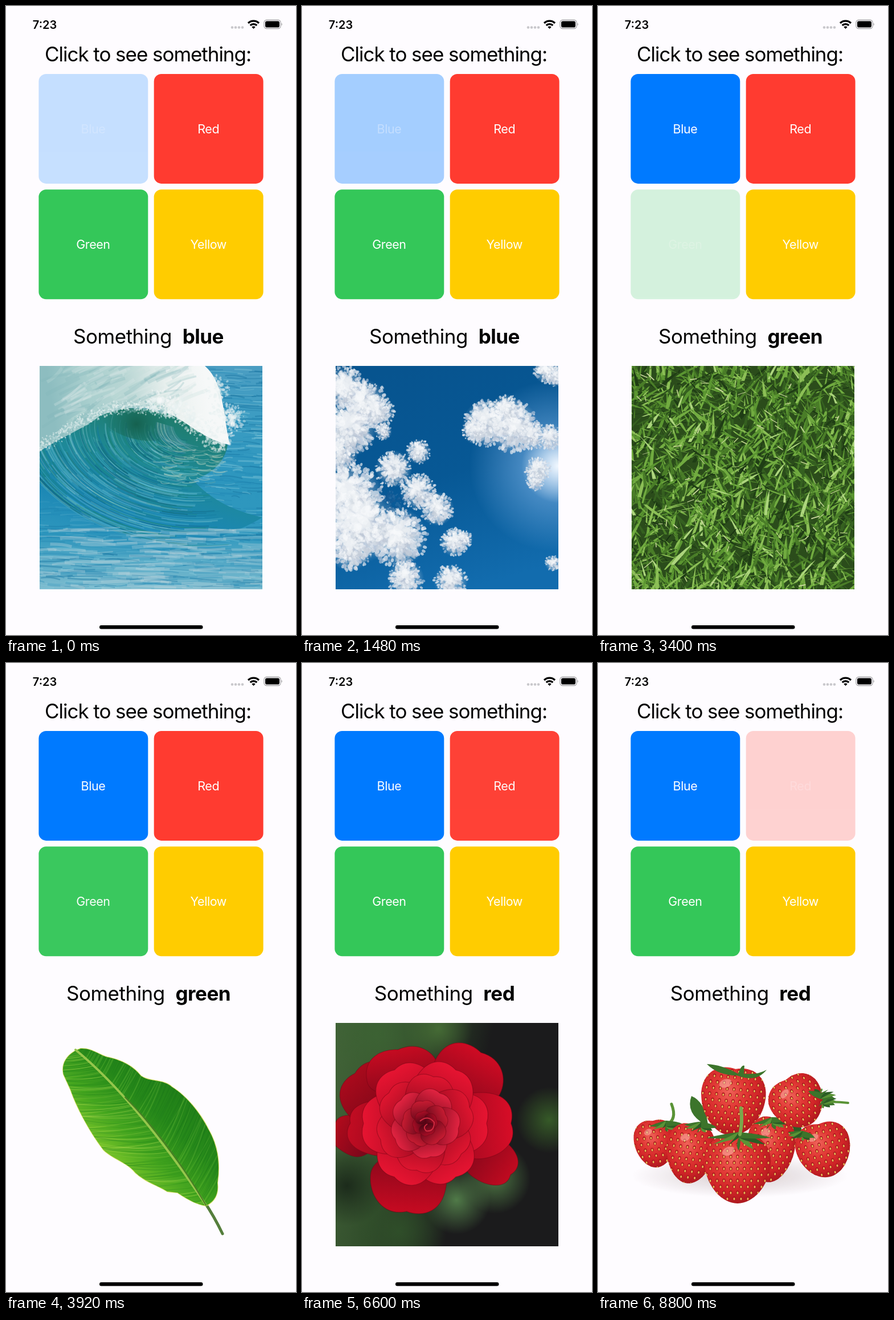
Animation of 509x1101 px, one loop 9.04 s. Source, as an HTML page with a canvas:

```html
<!DOCTYPE html>
<html lang="en">
<head>
<meta charset="utf-8">
<title>Click to see something</title>
<style>
  html, body { margin: 0; width: 100%; height: 100%; overflow: hidden; background: #fefcff; }
  svg, canvas { position: absolute; left: 0; top: 0; display: block; }
  canvas { left: 59px; top: 630px; }
  text { font-family: Inter, Roboto, sans-serif; font-optical-sizing: none; white-space: pre; text-anchor: middle; }
  .title { font-size: 35px; letter-spacing: -.03em; }
  .caption { font-size: 35px; letter-spacing: -.014em; }
  .caption tspan { font-weight: 700; }
  .button, .button text { opacity: var(--fade, 1); }
  .button text { font-size: 21.5px; letter-spacing: -.02em; fill: #fff; }
  .clock { font-size: 20px; font-weight: 600; }
</style>
</head>
<body>
<svg width="509" height="1101" viewBox="0 0 509 1101">
  <text class="clock" x="68" y="39.5">7:23</text>
  <g fill="#c9c8cc">
    <circle cx="397" cy="37.5" r="2.3"/><circle cx="403" cy="37.5" r="2.3"/>
    <circle cx="409" cy="37.5" r="2.3"/><circle cx="415" cy="37.5" r="2.3"/>
  </g>
  <g fill="none" stroke="#000" stroke-width="3.2">
    <path d="M425 30a13.500 13.500 0 0 1 19 0M428.700 34a8.300 8.300 0 0 1 11.600 0"/>
    <path d="M431.300 36.800a4.600 4.600 0 0 1 6.400 0L434.500 40Z" fill="#000" stroke="none"/>
  </g>
  <rect x="453" y="24.500" width="29" height="15" rx="4.500" fill="none" stroke="#a3a2a5" stroke-width="1.300"/>
  <rect x="455" y="26.500" width="25" height="11" rx="2.800"/>
  <path d="M483.500 29.500q2.600 2.500 0 5Z" fill="#a3a2a5"/>
  <text class="title" x="249" y="97">Click to see something:</text>
  <g id="buttons"></g>
  <text class="caption" x="250" y="591">Something  <tspan id="word">blue</tspan></text>
  <rect x="164" y="1084" width="181.500" height="6.500" rx="3.250"/>
</svg>
<script>
const SIZE = 391, LOOP = 9040, TAU = Math.PI * 2;
const $ = id => document.getElementById(id);

let seed = 1;
const rand = (a = 0, b = 1) => {
  seed = (seed * 1664525 + 1013904223) >>> 0;
  return a + (b - a) * seed / 4294967296;
};
const pick = list => list[Math.floor(rand(0, list.length))];

// ---- drawing helpers ----
function ramp(g, colors) {
  colors.forEach((c, i) => g.addColorStop(i / (colors.length - 1), c));
  return g;
}
const linear = (c, x0, y0, x1, y1, ...colors) => ramp(c.createLinearGradient(x0, y0, x1, y1), colors);
const radial = (c, x, y, r, ...colors) => ramp(c.createRadialGradient(x, y, 0, x, y, r), colors);
function fill(c, d, paint) {
  c.fillStyle = paint;
  c.fill(new Path2D(d));
}
function line(c, d, paint, width) {
  c.strokeStyle = paint;
  c.lineWidth = width;
  c.stroke(new Path2D(d));
}
function oval(c, x, y, rx, ry, turn, paint) {
  c.beginPath();
  c.ellipse(x, y, rx, ry, turn, 0, TAU);
  c.fillStyle = paint;
  c.fill();
}
const glow = (c, x, y, r, color) => oval(c, x, y, r, r, 0, radial(c, x, y, r, color, color + "00"));
function cover(c, paint) {
  c.fillStyle = paint;
  c.fillRect(0, 0, SIZE, SIZE);
}
// scatter small discs around a point, thinning outwards
function puff(c, x, y, r, colors, count) {
  for (let i = 0; i < count; i++) {
    const a = rand(0, TAU), d = r * rand() ** .6;
    const s = 1 + r * rand(.03, .2) * (1.3 - d / r);
    oval(c, x + d * Math.cos(a), y + d * Math.sin(a), s, s * .75, a, pick(colors));
  }
}

// ---- pictures ----
function wave(c) {
  cover(c, linear(c, 0, 0, 0, SIZE, "#4b9dc2", "#3b9cc2", "#2d96be", "#2f98be", "#7ebccf"));
  for (let i = 0; i < 900; i++) {
    const y = rand(0, SIZE), x = rand(-30, SIZE), w = rand(12, 70);
    line(c, `M${x} ${y}q${w / 2} ${rand(-4, 4)} ${w} ${rand(-2, 5)}`, pick(["#15709e66", "#86c8d966", "#2288b460"]), rand(1, 3));
  }
  fill(c, "M0 140C60 85 150 62 215 80C260 92 290 128 330 138C325 170 300 190 270 200C300 235 345 255 391 265C345 295 200 350 0 330Z",
    linear(c, 180, 75, 110, 335, "#1f7c6c", "#1e8996", "#1b87b4", "#2790bb00"));
  for (let i = 0; i < 520; i++) {
    const r = rand(.1, 1.35), a = rand(1.2, 2.7);
    c.beginPath();
    c.ellipse(255, 115, 225 * r, 148 * r, .12, a, a + rand(.2, .75));
    c.strokeStyle = pick(["#0d5c7866", "#4aacc460", "#147a9e66", "#8fd0d455", "#1a806d55"]);
    c.lineWidth = rand(.8, 2.6);
    c.stroke();
  }
  for (let i = 0; i < 60; i++) {
    const x = rand(225, 330), y = 140 + rand(0, 65);
    line(c, `M${x} ${y}q-14 4 -${rand(14, 34)} ${rand(-5, 3)}`, pick(["#d4e0c866", "#b9d3c266", "#76aaa066"]), rand(1, 3));
  }
  oval(c, 170, 102, 62, 26, .25, radial(c, 170, 102, 60, "#15614f", "#1a705f00"));
  for (let i = 0; i < 30; i++)
    line(c, `M${205 + i} ${98 + i * .3}q${-4 + i * .3} 28 ${24 + i * .7} ${34 + rand(0, 12)}`, pick(["#a7ccca77", "#5598a077", "#38808a77"]), 1.2);
  const lip = "C290 130 265 102 230 85C195 70 150 68 105 88C75 112 30 128 0 150Z";
  fill(c, "M0 0H290C325 30 322 90 334 138" + lip, linear(c, 20, 60, 290, 20, "#8dbdc0", "#a9cfce", "#b9d6d4", "#e9f0ee", "#f6f8f8"));
  for (let i = 0; i < 110; i++) {
    const x = rand(0, 240), y = rand(0, 118 - x * .2);
    line(c, `M${x} ${y}q18 -10 ${rand(25, 60)} -${rand(12, 30)}`, pick(["#dde9e744", "#7fb3b744", "#c4dcda44"]), rand(2, 7));
  }
  for (let i = 0; i < 75; i++) {
    const t = i / 75;
    puff(c, t * 240, 145 - 75 * Math.sin(t * 2.3), rand(8, 14), ["#e8f1f099", "#8ebfc188", "#c5dfe088"], 9);
  }
  for (const [x, y] of [[210, 62], [240, 75], [268, 95], [295, 118], [318, 128], [318, 85], [310, 40], [340, 92]])
    puff(c, x, y, 24, ["#f6f8f877", "#e5efef77"], 70);
  for (let i = 0; i < 170; i++)
    line(c, `M${rand(-20, 370)} ${rand(285, 391)}q20 ${rand(-5, 5)} ${rand(30, 100)} ${rand(-3, 5)}`, pick(["#c7d9df55", "#a9cdd955", "#3494bb55"]), rand(1, 6));
}

function sky(c) {
  cover(c, linear(c, 120, 0, 230, SIZE, "#07548f", "#075895", "#126cae"));
  glow(c, 385, 175, 150, "#6ca6dc");
  glow(c, 391, 175, 65, "#f2f8ff");
  const clouds = [
    [15, 38, 33], [50, 65, 36], [25, 110, 42], [74, 80, 26], [8, 155, 27], [84, 115, 13],
    [265, 100, 36], [310, 105, 40], [245, 114, 20], [345, 122, 22], [300, 75, 22], [376, 125, 20],
    [28, 225, 48], [102, 180, 28], [145, 150, 19], [45, 280, 56], [108, 300, 46], [145, 220, 28],
    [178, 250, 26], [25, 320, 34], [208, 308, 22], [226, 303, 13], [123, 372, 28], [202, 377, 26],
    [370, 8, 20], [386, 18, 16], [355, 182, 20], [350, 202, 14], [381, 345, 12]
  ];
  for (const [x, y, r] of clouds) {
    glow(c, x, y, r * 1.15, "#c9d4e2");
    puff(c, x, y, r * 1.15, ["#d5dde8bb", "#b4c5d9aa", "#e4e9f0bb"], r * 5);
  }
  for (const [x, y, r] of clouds) {
    puff(c, x + r * .1, y + r * .25, r * .8, ["#bcc6d455", "#ccd4df55"], r * 3);
    puff(c, x - r * .1, y - r * .25, r * .85, ["#f7f9fb88", "#e9edf277"], r * 4);
  }
  puff(c, 100, 237, 20, ["#145a94bb", "#2a6da3aa"], 60);
}

function grass(c) {
  cover(c, "#2b4c1b");
  const tones = ["#1f3d15", "#356020", "#4a7d28", "#5b9631", "#71ab40", "#8cbf56", "#add57d"];
  for (let i = 0; i < 2600; i++) {
    const x = rand(-20, 410), y = rand(-20, 420), len = rand(14, 52);
    const a = rand() < .75 ? rand(-2.5, -.4) : rand(-.4, 1);
    const dx = len * Math.cos(a), dy = len * Math.sin(a), w = rand(1, 3.4);
    const tone = tones[Math.min(6, Math.floor(rand(0, 5) + rand(0, i / 1000)))];
    fill(c, `M${x - w} ${y}Q${x + dx * .4 - w} ${y + dy * .6} ${x + dx} ${y + dy}Q${x + dx * .5 + w} ${y + dy * .5} ${x + w} ${y}Z`, tone);
  }
  for (let i = 0; i < 200; i++)
    line(c, `M${rand(0, 391)} ${rand(0, 391)}l${rand(-16, 16)} ${rand(-13, 13)}`, pick(["#d0dba4", "#bdd18a", "#172f12"]), rand(.6, 1.8));
}

function leaf(c) {
  const edge = "M72 45C52 52 37 68 42 90L54 116C64 145 86 188 112 222C128 238 154 244 168 262C185 278 207 284 224 295L242 297C264 312 278 318 292 320C310 311 314 296 312 280C317 248 313 215 296 186C282 158 258 128 232 112C216 98 194 104 178 93C162 73 139 64 119 60C104 56 92 44 72 45Z";
  c.lineCap = "round";
  line(c, "M289 313Q306 338 321 369", "#557e3c", 5);
  line(c, edge, "#d9df65", 2);
  c.save();
  c.clip(new Path2D(edge));
  cover(c, linear(c, 110, 230, 230, 100, "#7cc629", "#43a51e", "#278a1a", "#218018"));
  const rib = t => [62 + 230 * t, 47 + 190 * t + 81 * t * t];
  for (let i = 0; i < 135; i++) {
    const [x, y] = rib(i / 135);
    line(c, `M${x} ${y}q22 -34 48 -${rand(80, 130)}`, pick(["#13681533", "#69b83a50", "#1c771a50"]), rand(.8, 2.2));
    line(c, `M${x} ${y}q-40 10 -125 ${rand(-8, 18)}`, pick(["#25851a50", "#a5d84a60", "#4fa62960"]), rand(.8, 2.2));
  }
  c.restore();
  line(c, "M63 47Q170 135 292 319", "#96c64c", 4);
  line(c, "M150 130Q225 205 292 319", "#497d26", 2);
}

function rose(c) {
  cover(c, linear(c, 0, 60, 250, 120, "#426238", "#314d2b", "#1b1b1c"));
  [[70, 20, 110, "#3c6233"], [180, 10, 60, "#456b35"], [375, 170, 58, "#365a28"], [280, 272, 62, "#4d7643"],
   [212, 310, 60, "#507a48"], [110, 365, 85, "#2f4e29"], [20, 285, 70, "#1c2b1b"]].forEach(a => glow(c, ...a));
  const petal = (x, y, rx, ry, turn, a, b) => {
    c.save();
    c.translate(x, y);
    c.rotate(turn);
    const d = `M${-rx} 0C${-rx} ${-ry} ${-rx * .4} ${-ry * 1.15} 0 ${-ry}C${rx * .6} ${-ry * 1.2} ${rx} ${-ry * .6} ${rx} 0C${rx} ${ry} ${-rx} ${ry} ${-rx} 0Z`;
    fill(c, d, linear(c, 0, -ry, 0, ry, a, b));
    line(c, d, "#73051477", 1.2);
    c.restore();
  };
  petal(38, 200, 34, 44, -1.1, "#b10a1c", "#69071a");
  petal(265, 235, 42, 52, 2.2, "#bf0a20", "#77071a");
  petal(68, 125, 58, 50, -.75, "#a80a1c", "#790718");
  petal(118, 90, 64, 44, -.2, "#c40b21", "#80071a");
  petal(232, 94, 64, 48, .5, "#cd0b23", "#8b081c");
  petal(250, 180, 58, 58, 1.5, "#d60d27", "#96081e");
  petal(128, 272, 67, 58, 3.2, "#c50a21", "#7c071a");
  petal(80, 185, 48, 55, -1.4, "#c00c22", "#8a081c");
  const rings = [[58, 54, 50, 6], [45, 43, 38, 6], [31, 33, 28, 5], [19, 23, 20, 5], [9, 14, 12, 4]];
  rings.forEach(([d, rx, ry, n], k) => {
    for (let i = 0; i < n; i++) {
      const a = i * TAU / n + k * .7;
      petal(157 + d * Math.cos(a), 176 + d * Math.sin(a), rx, ry, a + Math.PI / 2,
        ["#e51431", "#dc152f", "#e02340", "#c41b31", "#a60d25"][k], ["#a40920", "#8c081d", "#71071a", "#5b0618", "#3c0412"][k]);
    }
  });
  line(c, "M148 172q14 -12 25 2q0 17 -14 15q-7 -7 2 -12", "#d02a40", 2);
}

function berries(c) {
  c.save();
  c.translate(190, 268);
  c.scale(1, .2);
  glow(c, 0, 0, 190, "#d6ccce");
  c.restore();
  c.lineCap = "round";
  const green = ["#3c742b", "#5a9336", "#2b5d25"];
  const shape = new Path2D("M0 -.47C.32 -.55 .55 -.33 .5 -.02C.46 .26 .24 .5 0 .5C-.24 .5 -.46 .26 -.5 -.02C-.55 -.33 -.32 -.55 0 -.47Z");
  const berry = (x, y, w, h, turn) => {
    c.save();
    c.translate(x, y);
    c.rotate(turn);
    c.scale(w, h);
    c.clip(shape);
    c.fillStyle = radial(c, -.08, -.14, .7, "#f0645a", "#e23a36", "#d02427", "#a3151c");
    c.fillRect(-1, -1, 2, 2);
    c.scale(1 / w, 1 / h);
    for (let row = -5; row < 6; row++)
      for (let col = -5; col < 6; col++) {
        const sx = (col + (row & 1) / 2) * 12, sy = row * 10.5;
        oval(c, sx, sy, 2.6, 3.4, 0, "#a8161d");
        oval(c, sx, sy + .5, 1.5, 2.2, 0, "#e6b755");
      }
    oval(c, -w * .14, -h * .25, w * .1, h * .06, -.4, "#ffc5b977");
    c.restore();
  };
  const crown = (x, y, r, turn) => {
    for (let i = 0; i < 7; i++) {
      const a = turn + (i - 3) * .46, tx = x + r * Math.sin(a), ty = y + r * .48 * Math.cos(a);
      fill(c, `M${x} ${y - 5}Q${(x + tx) / 2 + 6} ${(y + ty) / 2 - 5} ${tx} ${ty}Q${(x + tx) / 2 - 6} ${(y + ty) / 2 + 5} ${x} ${y + 5}Z`, green[i % 3]);
    }
  };
  fill(c, "M129 178Q94 158 105 128Q128 137 134 177Z", green[0]);
  fill(c, "M283 200Q278 178 290 172Q303 182 296 202Z", green[2]);
  berry(178, 137, 112, 120, .08);
  fill(c, "M185 92Q152 92 132 72Q158 73 187 89Q193 72 198 75L197 89Q222 91 237 82Q219 105 185 92Z", green[0]);
  berry(244, 221, 84, 116, .1);
  crown(246, 170, 35, .2);
  berry(291, 138, 94, 92, -.5);
  line(c, "M334 139Q356 137 380 140", green[1], 4);
  crown(335, 137, 26, 1);
  crown(331, 128, 28, 2.6);
  berry(41, 211, 72, 84, -.1);
  line(c, "M60 179Q81 170 70 142", green[1], 5);
  crown(60, 176, 30, .1);
  berry(103, 228, 84, 106, .1);
  crown(122, 178, 30, -.2);
  berry(337, 222, 95, 97, -.2);
  crown(300, 194, 26, -.4);
  berry(186, 255, 115, 122, 0);
  crown(188, 196, 58, 0);
  line(c, "M190 195Q195 175 192 149", "#79a84c", 6);
}

// ---- scene ----
const TILE = 191.9;
const tiles = {
  blue: ["#007aff", 57.4, 119, "Blue"], red: ["#ff3b30", 259.7, 119, "Red"],
  green: ["#34c759", 57.4, 321.3, "Green"], yellow: ["#ffcc00", 259.7, 321.3, "Yellow"]
};
$("buttons").innerHTML = Object.entries(tiles).map(([id, [color, x, y, label]]) =>
  `<g class="button" id="${id}"><rect x="${x}" y="${y}" width="${TILE}" height="${TILE}" rx="13" fill="${color}"/>` +
  `<text x="${x + TILE / 2 - .4}" y="${y + 104}">${label}</text></g>`).join("");

const pictures = {
  w: ["blue", wave], s: ["blue", sky], g: ["green", grass],
  l: ["green", leaf], r: ["red", rose], b: ["red", berries]
};
for (const key in pictures) {
  const canvas = document.createElement("canvas");
  canvas.width = canvas.height = SIZE;
  seed = key.charCodeAt(0);
  pictures[key][1](canvas.getContext("2d"));
  pictures[key][1] = document.body.appendChild(canvas);
}

// picture and opacity (%) of the tapped button, one entry per step
const steps = ("w22 s22 s30 w22 w22 s25 s35 w22 s22 w97 g40 g20 l22 l20 g20 g20 l97 l22 g22 g20 l90 " +
  "r22 r22 b22 b20 r22 b25 r97 b22 b20 r22 r20 b20 r20 r20 b22 b22").split(" ");

// steps last 240 ms, now and then 280, on a 40 ms clock
const stepAt = ms => Math.min(steps.length - 1, Math.ceil((Math.floor(ms / 40) + .48) / 6.097) - 1);

function show(step) {
  const key = steps[step][0], name = pictures[key][0];
  for (const id in tiles) $(id).style.setProperty("--fade", id === name ? steps[step].slice(1) / 100 : 1);
  for (const k in pictures) pictures[k][1].style.visibility = k === key ? "visible" : "hidden";
  $("word").textContent = name;
}

const start = performance.now();
let shown = -1;
function tick() {
  const step = stepAt((performance.now() - start) % LOOP);
  if (step !== shown) show(shown = step);
  requestAnimationFrame(tick);
}
tick();
</script>
</body>
</html>
```
